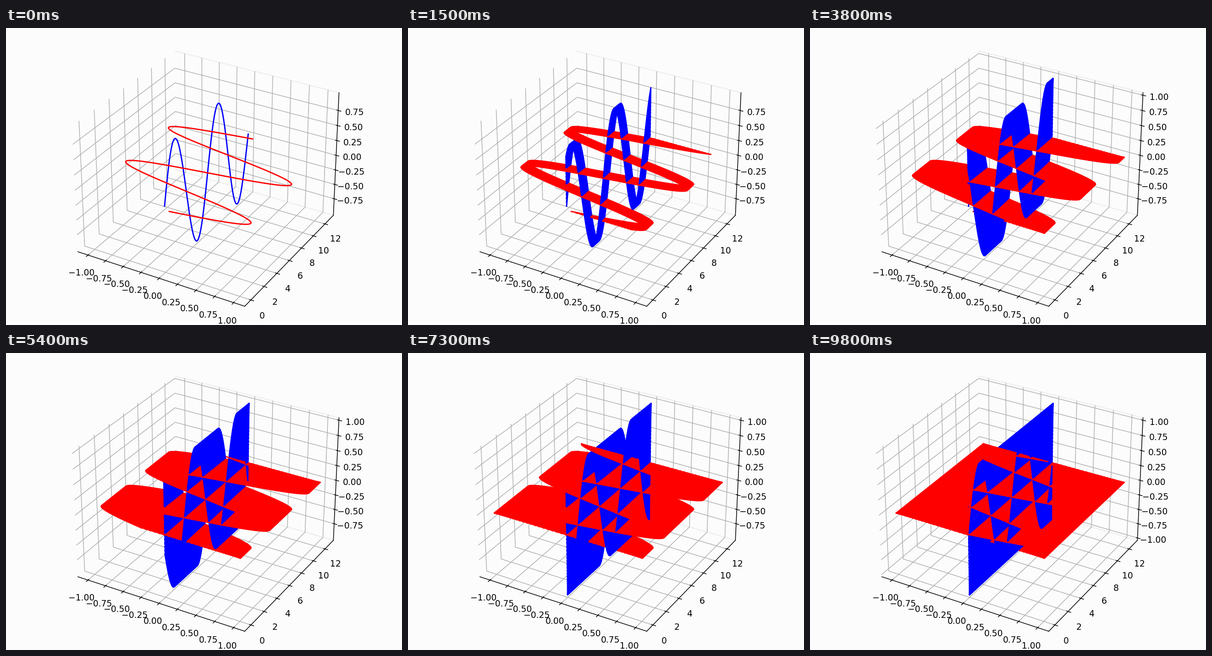
A matplotlib script for the animation above (9900 ms loop, 864 by 648 pixels).

```python
import numpy as np
import matplotlib.pyplot as plt
from matplotlib.animation import FuncAnimation

FRAMES = 99
STEP = 2 * np.pi / 100
BACK = "#fcfcfc"
EDGE = 1 / 48  # gap between the limits and the drawn box

plt.rcParams["font.family"] = "DejaVu Sans"

fig = plt.figure(figsize=(6.4, 4.8), dpi=135, facecolor=BACK)
ax = fig.add_axes([0, 0, 1, 1], projection="3d", facecolor=BACK)
ax.view_init(elev=30, azim=-60)

for axis, edge in ((ax.xaxis, "none"), (ax.yaxis, "#ececec"), (ax.zaxis, "none")):
    axis.pane.set_alpha(None)
    axis.pane.set_facecolor("none")
    axis.pane.set_edgecolor(edge)

y = np.linspace(0, 4 * np.pi, 100)
zero = np.zeros_like(y)
waves = np.array([np.sin(y + STEP * (i + 1)) for i in range(FRAMES)])

# Each step adds one vertical and one horizontal wave over the earlier ones.
pairs = []
for wave in waves:
    blue, = ax.plot(zero, y, wave, color="blue", lw=1.5)
    red, = ax.plot(wave, y, zero, color="red", lw=1.5)
    pairs.append((blue, red))


def padded(lo, hi):
    pad = 0.05 * (hi - lo)
    return lo - pad, hi + pad


ax.set_xticks(np.arange(-1, 1.01, 0.25))
ax.set_yticks(range(0, 13, 2))
ax.set_ylim(*padded(y[0], y[-1]), view_margin=EDGE)
z_ticks = np.arange(-1, 1.01, 0.25)


def update(i):
    for k, pair in enumerate(pairs):
        for line in pair:
            line.set_visible(k <= i)
    lo, hi = waves[:i + 1].min(), waves[:i + 1].max()
    inside = (z_ticks > lo - 1e-9) & (z_ticks < hi + 1e-9)
    ax.set_zticks(z_ticks[inside])
    ax.set_xlim(*padded(lo, hi), view_margin=EDGE)
    ax.set_zlim(lo, hi, view_margin=EDGE)
    return []


def init():
    return update(0)


anim = FuncAnimation(fig, update, frames=FRAMES, init_func=init,
                     interval=100, repeat=True, repeat_delay=0, blit=False)
plt.show()
```
